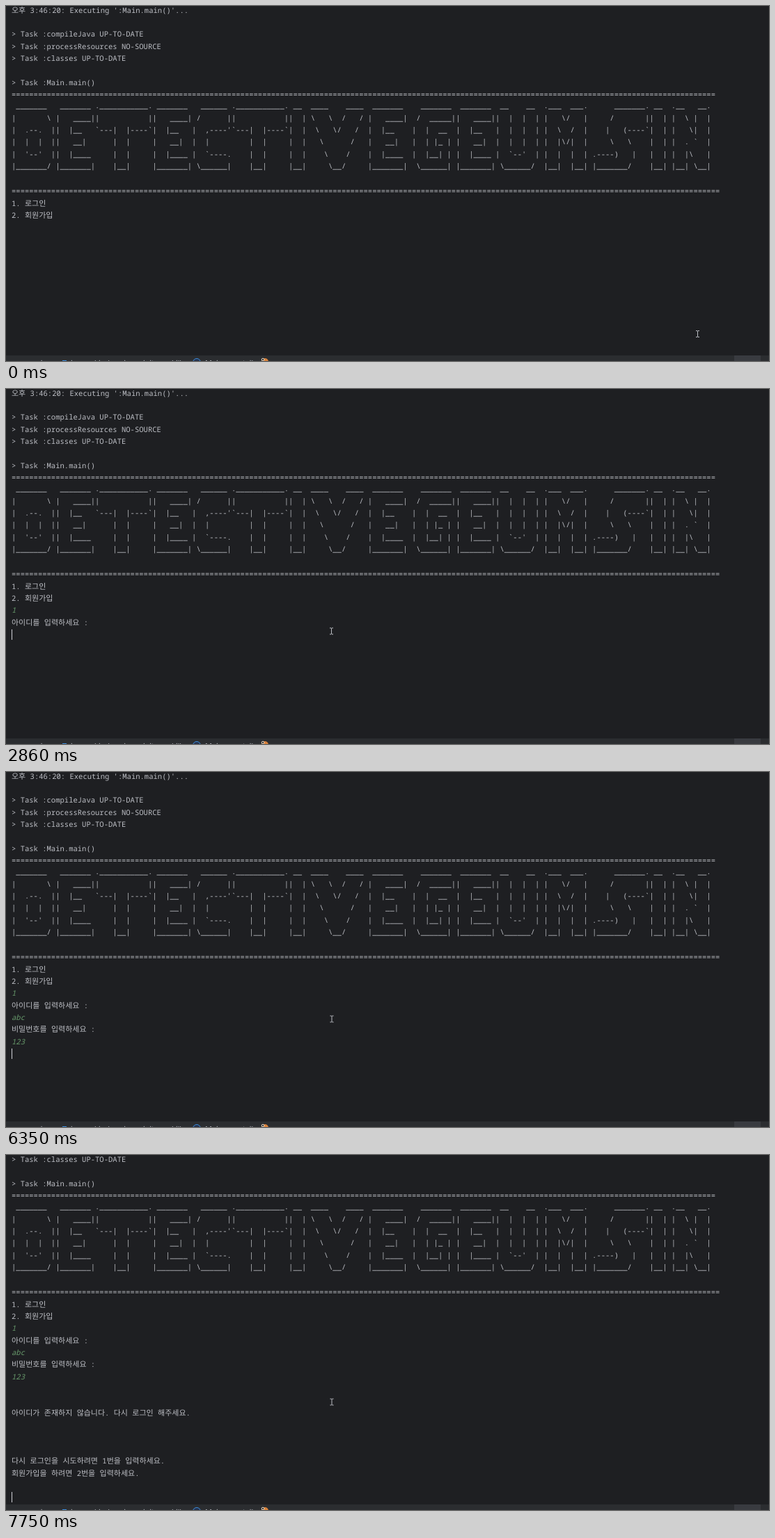
Recreate the animation shown at these times as an HTML page. Size 1096 px wide and 511 px high, loop 8000 ms.

```html
<!DOCTYPE html>
<html lang="ko">
<head>
<meta charset="utf-8">
<title>Console login</title>
<style>
  html, body { margin: 0; width: 100%; height: 100%; overflow: hidden; background: #1e1f22; }
  svg { display: block; width: 100%; height: 100%; }
  text { white-space: pre; fill: #bcbec4; text-rendering: geometricPrecision; }
  .mono { font: 10.54px "Noto Sans Mono", "DejaVu Sans Mono", monospace; font-variant-ligatures: none; }
  .ko { font: 11px "Noto Sans CJK KR", "Noto Sans CJK JP", sans-serif; }
  .art { transform: translateY(-1.2px); }
  .input { font-style: italic; fill: #67996b; }
  .crumb { font: 11px Inter, sans-serif; fill: #b4b8bf; }
</style>
</head>
<body>
<svg viewBox="0 0 1096 511">
  <rect width="1096" height="511" fill="#1e1f22"/>
  <g id="console"><rect id="caret" width="1" height="15" fill="#ced0d6"/></g>
  <path id="mouse" fill="none" stroke="#bcbec4" d="M-2.5-4.5h2l.5.5.5-.5h2M0-4V4M-2.5 4.5h2l.5-.5.5.5h2"/>
  <g id="bar">
    <rect y="503" width="1096" height="8" fill="#2b2d30"/>
    <rect x="1046" y="503" width="38" height="8" fill="#393b40"/>
    <text class="crumb" x="34" y="518">main</text>
    <path d="M81 511v-1h6v1z" fill="#3d8fe0"/>
    <text class="crumb" x="93" y="518">java</text>
    <text class="crumb" x="127" y="518">kind</text>
    <text class="crumb" x="163" y="518">view</text>
    <text class="crumb" x="197" y="518">init</text>
    <text class="crumb" x="238" y="518">kill</text>
    <circle cx="274" cy="513" r="5.5" fill="#25324d" stroke="#3d8fe0"/>
    <text class="crumb" x="286" y="518">Main</text>
    <text class="crumb" x="340" y="518">tail</text>
    <circle cx="372" cy="512" r="5" fill="#d9823b"/>
    <circle cx="369" cy="509" r="1.8" fill="#2b2d30" stroke="#e8dcc8"/>
  </g>
</svg>
<script>
const LOOP = 8000, LEFT = 8, CELL = 6.324, ROW = 17.37, BASE = 9.6;
const $ = id => document.getElementById(id);
const consoleBox = $("console"), caret = $("caret"), mouse = $("mouse");

// Banner letters, six rows each, separated by "~"
const glyphs = {
  D: " _______  ~|       \\~|  .--.  |~|  |  |  |~|  '--'  |~|_______/",
  E: " _______ ~|   ____|~|  |__~|   __|~|  |____~|_______|",
  T: ".___________.~|           |~`---|  |----`~    |  |~    |  |~    |__|",
  C: "  ______ ~ /      |~|  ,----'~|  |~|  `----.~ \\______|",
  I: " __  ~|  |~|  |~|  |~|  |~|__|",
  V: "____    ____ ~\\   \\  /   /~ \\   \\/   /~  \\      /~   \\    /~    \\__/",
  G: "  _______ ~ /  _____|~|  |  __~|  | |_ |~|  |__| |~ \\______|",
  U: " __    __  ~|  |  |  |~|  |  |  |~|  |  |  |~|  `--'  |~ \\______/",
  M: ".___  ___. ~|   \\/   |~|  \\  /  |~|  |\\/|  |~|  |  |  |~|__|  |__|",
  S: "     _______.~    /       |~   |   (----`~    \\   \\~.----)   |~|_______/",
  N: ".__   __. ~|  \\ |  |~|   \\|  |~|  . `  |~|  |\\   |~|__| \\__|",
  " ": " ~~~~~"
};

function banner(word) {
  const rows = Array(6).fill("");
  for (const ch of word) {
    const parts = glyphs[ch].split("~");
    parts.forEach((p, i) => rows[i] += p.padEnd(parts[0].length));
  }
  return rows;
}

const baseline = row => BASE + row * ROW;

function addLine(row, str, at = 0, cls = "") {
  const el = document.createElementNS("http://www.w3.org/2000/svg", "text");
  el.setAttribute("class", "mono " + cls);
  el.setAttribute("x", LEFT);
  el.setAttribute("y", baseline(row));
  for (const run of str.match(/[가-힣]+|[^가-힣]+/g) || []) {
    const span = document.createElementNS("http://www.w3.org/2000/svg", "tspan");
    if (/[가-힣]/.test(run)) span.setAttribute("class", "ko");
    span.textContent = run;
    el.append(span);
  }
  consoleBox.insertBefore(el, caret);
  return { el, at };
}

const lines = [
  "오후 3:46:20: Executing ':Main.main()'...", "",
  "> Task :compileJava UP-TO-DATE",
  "> Task :processResources NO-SOURCE",
  "> Task :classes UP-TO-DATE", "",
  "> Task :Main.main()",
  "=".repeat(160)
].map((s, i) => addLine(i, s));

lines.push(
  ...banner("DETECTIVE GEUMSIN").map((s, i) => addLine(8 + i, s, 0, "art")),
  addLine(15, "=".repeat(161)),
  addLine(16, "1. 로그인"),
  addLine(17, "2. 회원가입"),
  addLine(19, "아이디를 입력하세요 :", 2440),
  addLine(21, "비밀번호를 입력하세요 :", 5590),
  addLine(25, "아이디가 존재하지 않습니다. 다시 로그인 해주세요.", 7680),
  addLine(29, "다시 로그인을 시도하려면 1번을 입력하세요.", 7680),
  addLine(30, "회원가입을 하려면 2번을 입력하세요.", 7680)
);

const inputs = [
  [18, "1", [1100]],
  [20, "abc", [3670, 4470, 4730]],
  [22, "123", [5940, 6020, 6090]]
].map(([row, str, keys]) => ({ el: addLine(row, "", 0, "input").el, str, keys }));

// time, row, column; no row means the caret is hidden
const carets = [
  [0], [300, 18, 0], [1030], [1100, 18, 1], [1560, 19, 0],
  [2440, 20, 0], [3140], [3600, 20, 0], [3670, 20, 1], [4470, 20, 2], [4730, 20, 3],
  [5060, 21, 0], [5590, 22, 0], [5940, 22, 1], [6020, 22, 2], [6090, 22, 3],
  [6350, 23, 0], [7080], [7610, 23, 0], [7680, 32, 0]
];

// time, x, y
const path = [
  [70, 516, 334], [220, 516, 334], [440, 470, 373], [570, 465.5, 369.5],
  [2120, 465.5, 369.5], [2290, 466.5, 377], [2420, 466.5, 377],
  [2860, 467.5, 348.5], [2960, 467.5, 348.5], [3200, 468, 355.5], [LOOP, 468, 355.5]
];

function mouseAt(t) {
  if (t < 70) return [993.5, 472];
  const i = path.findIndex(p => t < p[0]);
  const [t0, x0, y0] = path[i - 1], [t1, x1, y1] = path[i];
  const k = (t - t0) / (t1 - t0);
  return [x0 + (x1 - x0) * k, y0 + (y1 - y0) * k];
}

function draw(t) {
  for (const { el, at } of lines) el.style.display = t >= at ? "" : "none";
  for (const { el, str, keys } of inputs)
    el.textContent = str.slice(0, keys.filter(k => t >= k).length);

  const [, row, col] = carets.findLast(c => t >= c[0]);
  caret.style.display = row === undefined ? "none" : "";
  if (row !== undefined) {
    caret.setAttribute("x", Math.floor(LEFT + col * CELL));
    caret.setAttribute("y", Math.round(baseline(row) - 11.2));
  }

  const scroll = t < 7680 ? 0 : t < 7750 ? -68 : -69;
  consoleBox.setAttribute("transform", `translate(0 ${scroll})`);
  mouse.setAttribute("transform", `translate(${mouseAt(t)})`);
}

const start = performance.now();
function tick() {
  draw((performance.now() - start) % LOOP);
  requestAnimationFrame(tick);
}
draw(0);
tick();
</script>
</body>
</html>
```
